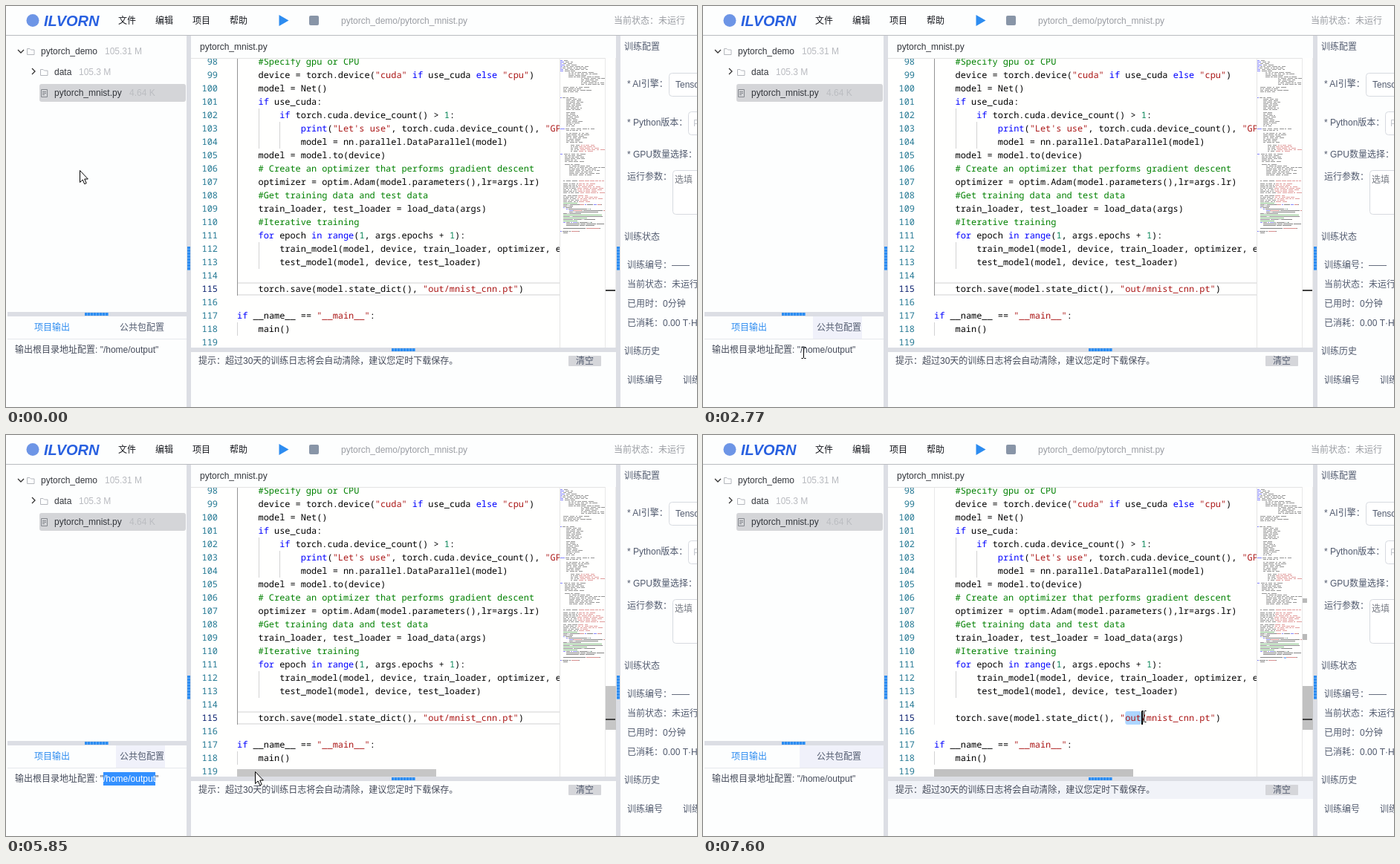
An HTML page that plays this animation: 930 by 540 pixels, repeating every 8000 ms.

```html
<!DOCTYPE html>
<html lang="zh-CN">
<head>
<meta charset="utf-8">
<title>Code editor</title>
<style>
  html, body { margin: 0; width: 100%; height: 100%; overflow: hidden; background: #fdfefe; }
  svg { display: block; }
  text { font: 12px "Liberation Sans", "Noto Sans CJK SC", sans-serif; white-space: pre; }
  .code { font: 11.911px "Noto Sans Mono", monospace; text-rendering: geometricPrecision; }
  .logo { font: italic bold 20px "Liberation Sans", sans-serif; }
</style>
</head>
<body>
<svg id="stage" width="930" height="540" viewBox="0 0 930 540"></svg>
<script>
const LOOP = 8000, CHAR = 7.147, CODE_X = 311, ROW = 18;
const BLUE = '#2d8cf0', INK = '#515a6e', PALE = '#b9bbc0', BAR = '#dcdee4';
const PATH = '/home/output';

const rect = (x, y, w, h, fill, more = '') =>
  `<rect x="${x}" y="${y}" width="${w}" height="${h}" fill="${fill}" ${more}/>`;
// y is the middle of the text line
const label = (x, y, str, fill = INK, more = '') =>
  `<text x="${x}" y="${y + 4}" fill="${fill}" ${more}>${str}</text>`;
const line = (d, stroke, w = 1, more = '') =>
  `<path d="${d}" fill="none" stroke="${stroke}" stroke-width="${w}" ${more}/>`;
const group = (id, body, more = '') => `<g id="${id}" ${more}>${body}</g>`;

const source = `    #Specify gpu or CPU
    device = torch.device("cuda" if use_cuda else "cpu")
    model = Net()
    if use_cuda:
        if torch.cuda.device_count() > 1:
            print("Let's use", torch.cuda.device_count(), "GPUs!")
            model = nn.parallel.DataParallel(model)
    model = model.to(device)
    # Create an optimizer that performs gradient descent
    optimizer = optim.Adam(model.parameters(),lr=args.lr)
    #Get training data and test data
    train_loader, test_loader = load_data(args)
    #Iterative training
    for epoch in range(1, args.epochs + 1):
        train_model(model, device, train_loader, optimizer, epoch)
        test_model(model, device, test_loader)

    torch.save(model.state_dict(), "out/mnist_cnn.pt")

if __name__ == "__main__":
    main()
`.split('\n');

function tokens(str) {
  const parts = str.match(/#.*|"[^"]*"|\w+|\s+|[^\w\s"#]+/g) || [];
  return parts.map(p => [p,
    p[0] === '#' ? '#008000' :
    p[0] === '"' ? '#ab1717' :
    /^(if|else|for|in|range|print)$/.test(p) ? '#0000ff' :
    /^\d+$/.test(p) ? '#098658' : '#000']);
}

function codeLines() {
  return source.map((str, i) => {
    const y = 75 + i * ROW;
    const indent = str.search(/\S|$/);
    const spans = tokens(str.trim()).map(([p, c]) => `<tspan fill="${c}">${p}</tspan>`).join('');
    return label(285, y, 98 + i, i === 17 ? '#0b216f' : '#237893', 'class="code" text-anchor="end"') +
      label(CODE_X + indent * CHAR, y, spans, '#000', 'class="code"');
  }).join('');
}

function minimap() {
  let seed = 7, out = '';
  const rnd = () => (seed = seed * 16807 % 2147483647) / 2147483647;
  const dash = (row, col, len, fill) => {
    const w = Math.min(len, 60 - col);
    if (w > 0) out += rect(746 + col, 71 + row * 2, w, 1, fill, 'opacity=".48"');
  };
  // first row, row count, indent, length
  const blocks = [[0, 5, 0, 16], [5, 3, 0, 38], [8, 1, 0, 22], [9, 4, 11, 44], [13, 5, 28, 32],
    [19, 5, 4, 34], [26, 1, 0, 20], [27, 8, 8, 22], [36, 10, 8, 18], [47, 1, 0, 58], [48, 9, 8, 28],
    [58, 5, 14, 44], [64, 1, 0, 42], [65, 7, 6, 28], [72, 7, 12, 44], [81, 1, 0, 11], [82, 15, 4, 56]];
  for (const [first, count, indent, len] of blocks) {
    const strings = first === 58 || first === 82;
    for (let r = first; r < first + count; r++) {
      if (rnd() < 0.12) continue;
      const end = indent + len * (0.55 + rnd() * 0.45);
      for (let col = indent, n = 0; col < end; n++) {
        const w = 2 + Math.floor(rnd() * 6);
        const keyword = n === 0 && indent === 0;
        dash(r, col, w, keyword ? '#0000ff' : strings && col > 22 ? '#c03030' : '#222');
        col += w + 1 + Math.floor(rnd() * 2);
      }
    }
  }
  source.forEach((str, i) => {
    let col = 0;
    for (const [p, c] of tokens(str)) {
      if (p.trim()) dash(97 + i, col, p.length, c);
      col += p.length;
    }
  });
  return out;
}

function splitter(x, y, w, h, gx, gy) {
  const wide = w > h;
  const grip = wide ? [gx, y + 1, 32, 4] : [x + 1, gy, 4, 32];
  const d = wide ? `M${gx} ${y + 3}h32` : `M${x + 3} ${gy}v32`;
  return rect(x, y, w, h, BAR) + rect(...grip, '#69b0f7') +
    line(d, BLUE, 4, 'stroke-dasharray="3 1"');
}

const folder = (x, y) =>
  line(`M${x + .5} ${y + .5}h3.5l1.5 1.5h4.5v6.5h-9.5z`, '#b4b7bd');
const field = (x, y, h) =>
  rect(x + .5, y + .5, 80, h, '#fff', 'rx="4" stroke="#d7dae0"');

function header() {
  const menu = ['文件', '编辑', '项目', '帮助'].map((s, i) => label(151 + i * 50, 20, s, '#17191f'));
  return '<circle cx="36" cy="19.500" r="8.500" fill="#6d95e6"/>' +
    '<text class="logo" x="51" y="27" fill="#2860e0">ILVORN</text>' + menu.join('') +
    `<path d="M367.500 12L380.500 19.500L367.500 27z" fill="${BLUE}"/>` +
    rect(408, 13, 13, 13, '#8895a7', 'rx="2"') +
    label(451, 20, 'pytorch_demo/pytorch_mnist.py', '#9a9da3') +
    label(818, 20, '当前状态：未运行', '#9a9da3') +
    rect(0, 39, 930, 1, '#b9bbc0');
}

function tree() {
  return line('M16 59l4 4l4-4', '#333', 1.3) + folder(28, 57) +
    label(47, 61, 'pytorch_demo', '#33363c') + label(133, 61, '105.31 M', PALE) +
    line('M35 84l4 4l-4 4', '#333', 1.3) + folder(46, 85) +
    label(65, 89, 'data', '#33363c') + label(98, 89, '105.3 M', PALE) +
    rect(45, 105, 197, 24, '#d4d5d8', 'rx="3"') +
    line('M47.500 112.500h8v10h-8zM49 115.500h5M49 117.500h5M49 119.500h3', '#85888e') +
    label(65, 117, 'pytorch_mnist.py', '#33363c') + label(166, 117, '4.64 K', '#bbbdc1');
}

function output() {
  return rect(148, 418, 66, 30, '#f0f1fa', 'id="tabBg"') + rect(2, 448, 241, 1, '#e6e8ec') +
    label(38, 433, '项目输出', BLUE) + label(153, 433, '公共包配置', INK, 'id="tab"') +
    rect(131, 454, 0, 18, '#3390ff', 'id="pathBg"') +
    label(12, 463, `输出根目录地址配置: "<tspan id="picked" fill="#fff"></tspan><tspan id="rest">${PATH}</tspan>"`, '#454b5a', 'id="config"');
}

function guides() {
  return line('M311.500 70V390', '#939393', 1, 'id="guide"') +
    line('M340.500 138V192M340.500 318V354M368.500 156V192M311.500 426V444', '#d3d3d3');
}

function editor() {
  return rect(249, 70, 572, 390, '#fffffe') + label(261, 55, 'pytorch_mnist.py', '#33363c') +
    '<clipPath id="view"><rect x="249" y="70" width="497" height="390"/></clipPath>' +
    group('code',
      line('M312 373H746M312 389H746', '#e8e8e8', 2, 'id="active"') +
      rect(568.3, 372, 0, ROW, '#add6ff', 'id="codeBg" rx="3"') +
      guides() + codeLines() + rect(0, 372, 2, ROW, '#000', 'id="caret"'),
      'clip-path="url(#view)"') +
    rect(249, 70, 558, 1, '#e3e3e3') + rect(745, 70, 1, 390, '#e4e4e4') +
    minimap() + rect(806, 70, 1, 390, '#e8e8e8') + rect(820, 70, 1, 390, '#eee') +
    group('bars', rect(807, 338, 14, 59, '#c1c1c1') + rect(311, 450, 268, 10, '#c1c1c1')) +
    group('marks', rect(807, 220, 6, 6, '#b9b9b9') + rect(807, 268, 6, 8, '#b9b9b9') +
      rect(782, 299, 3, 2, '#8fc3ff')) +
    rect(807, 382, 13, 2, '#424242');
}

function logPanel() {
  return rect(249, 466, 572, 24, '#f1f3f8', 'id="logBg"') +
    label(259, 478, '提示：超过30天的训练日志将会自动清除，建议您定时下载保存。', '#454b5a') +
    rect(757, 471, 44, 14, '#d5d6da', 'rx="1"') + label(767, 478, '清空');
}

function sidePanel() {
  const rows = [[832, 55, '训练配置'], [836, 105, '* AI引擎：'], [836, 157, '* Python版本：'],
    [836, 200, '* GPU数量选择：'], [836, 230, '运行参数：'], [832, 311, '训练状态'],
    [836, 349, '训练编号：——'], [836, 375, '当前状态：未运行'], [836, 401, '已用时：0分钟'],
    [836, 427, '已消耗：0.00 T·H'], [832, 465, '训练历史'], [836, 504, '训练编号'], [911, 504, '训练时间']];
  return field(892, 90, 31) + field(918, 142, 31) + field(897, 221, 59) +
    label(901, 106, 'TensorFlow') + label(925, 158, 'Python', '#c5c8ce') +
    label(900, 234, '选填', '#777b84') + rows.map(r => label(...r)).join('');
}

const cursors =
  group('arrow', '<path d="M.5 .5V16.500L4.200 13L6.700 18.700L9.200 17.600L6.700 12H11.300z" fill="#fff" stroke="#000"/>') +
  group('hand', '<path d="M5.500 14V2a1.500 1.500 0 0 1 3 0V8.500q3-1 3 .5q2.500-.8 2.800.8q2.300-.6 2.400 1.200V16q0 2-1.500 4V22H7.500V20.500L2 14.500q-1.500-2.200.3-2.600q1.500 0 3.200 2.100z" fill="#fff" stroke="#000"/>') +
  group('beam', line('M-3 -7.500H-1L0 -6.500L1 -7.500H3M-3 7.500H-1L0 6.500L1 7.500H3M0 -6.500V6.500', '#000'));

document.getElementById('stage').innerHTML =
  rect(0, 0, 930, 540, '#fdfefe') + tree() + output() + editor() + sidePanel() + logPanel() +
  splitter(2, 412, 241, 6, 106, 0) + splitter(249, 460, 572, 6, 519, 0) +
  splitter(243, 40, 6, 500, 0, 324) + splitter(821, 40, 6, 500, 0, 324) +
  header() + cursors;

const $ = id => document.getElementById(id);
const show = (id, on) => $(id).setAttribute('visibility', on ? 'visible' : 'hidden');

// x of every gap between the letters of the path
const config = $('config'), lead = config.textContent.indexOf('/');
const gaps = [...PATH].map((_, i) => config.getStartPositionOfChar(lead + i).x);
gaps.push(config.getEndPositionOfChar(lead + PATH.length - 1).x);

// bursts of pointer movement: start, end, steps
const bursts = [[1500, 2250, 15], [2310, 2340, 2], [2770, 3550, 15], [3610, 3730, 3], [4100, 4160, 2],
  [5530, 6290, 15], [6350, 6470, 3], [6750, 6750, 1], [7120, 7600, 9]];
// pointer: time, x, y
const track = [[0, 99, 221], [1450, 99, 221], [1660, 118, 285], [1770, 140, 370], [1875, 160, 440],
  [2040, 150, 456], [2250, 137, 465], [2340, 136, 465], [2770, 135, 467], [2880, 132.5, 466],
  [3000, 136, 466], [3300, 170, 470], [3550, 195, 472], [3610, 199, 473], [3730, 205, 474],
  [4100, 202, 474], [4160, 205, 474], [5530, 208, 472], [5690, 262, 468], [5900, 400, 440],
  [6120, 530, 405], [6290, 569, 391], [6470, 570, 375], [6750, 571, 375], [7120, 571, 375], [7600, 593, 379]];

function stepped(t) {
  let q = 0;
  for (const [start, end, n] of bursts) {
    if (t < start) break;
    const step = (end - start) / (n - 1);
    q = t >= end ? end : start + Math.floor((t - start) / step) * step;
  }
  return q;
}

function pointer(q) {
  const i = track.findIndex(k => k[0] > q);
  if (i < 0) return track[track.length - 1].slice(1);
  const [t0, x0, y0] = track[i - 1], [t1, x1, y1] = track[i];
  const f = (q - t0) / (t1 - t0);
  return [x0 + (x1 - x0) * f, y0 + (y1 - y0) * f];
}

function nearestGap(x) {
  let best = 0;
  gaps.forEach((g, i) => { if (Math.abs(g - x) < Math.abs(gaps[best] - x)) best = i; });
  return best;
}

function draw(t) {
  const q = stepped(t), [x, y] = pointer(q), clicked = q >= 7120;

  const onTab = x > 130 && x < 243 && y >= 418 && y <= 448;
  const onText = x < 206 && y >= 454 && y < 470.5;
  const onCode = x > 311 && x < 745 && y > 70 && y < 450;
  const kind = onTab ? 'hand' : onText || onCode ? 'beam' : 'arrow';
  for (const id of ['arrow', 'hand', 'beam']) show(id, id === kind);
  const dx = { arrow: 0, hand: -7, beam: .5 }[kind];
  $(kind).setAttribute('transform', `translate(${Math.round(x) + dx} ${Math.round(y)})`);

  show('tabBg', q > 1820);
  $('tabBg').setAttribute('x', clicked ? 130 : 148);
  $('tabBg').setAttribute('width', clicked ? 113 : 66);
  $('tab').setAttribute('fill', onTab ? BLUE : INK);

  const n = q >= 2880 && !clicked ? nearestGap(x) : 0;
  $('pathBg').setAttribute('x', gaps[0]);
  $('pathBg').setAttribute('width', gaps[n] - gaps[0]);
  $('picked').textContent = PATH.slice(0, n);
  $('rest').textContent = PATH.slice(n);

  $('bars').setAttribute('opacity', Math.max(0, Math.min(1, (t - 5760) / 100)));
  show('logBg', clicked);
  const m = clicked ? Math.max(0, Math.min(3, Math.round((x - CODE_X) / CHAR) - 36)) : 0;
  $('codeBg').setAttribute('width', m * CHAR);
  $('caret').setAttribute('x', Math.round(CODE_X + (36 + m) * CHAR));
  $('guide').setAttribute('stroke', m ? '#e8e8e8' : '#939393');
  show('caret', clicked);
  show('active', m === 0);
  show('marks', m === 3);
}

function tick() {
  draw(performance.now() % LOOP);
  requestAnimationFrame(tick);
}
tick();
</script>
</body>
</html>
```
